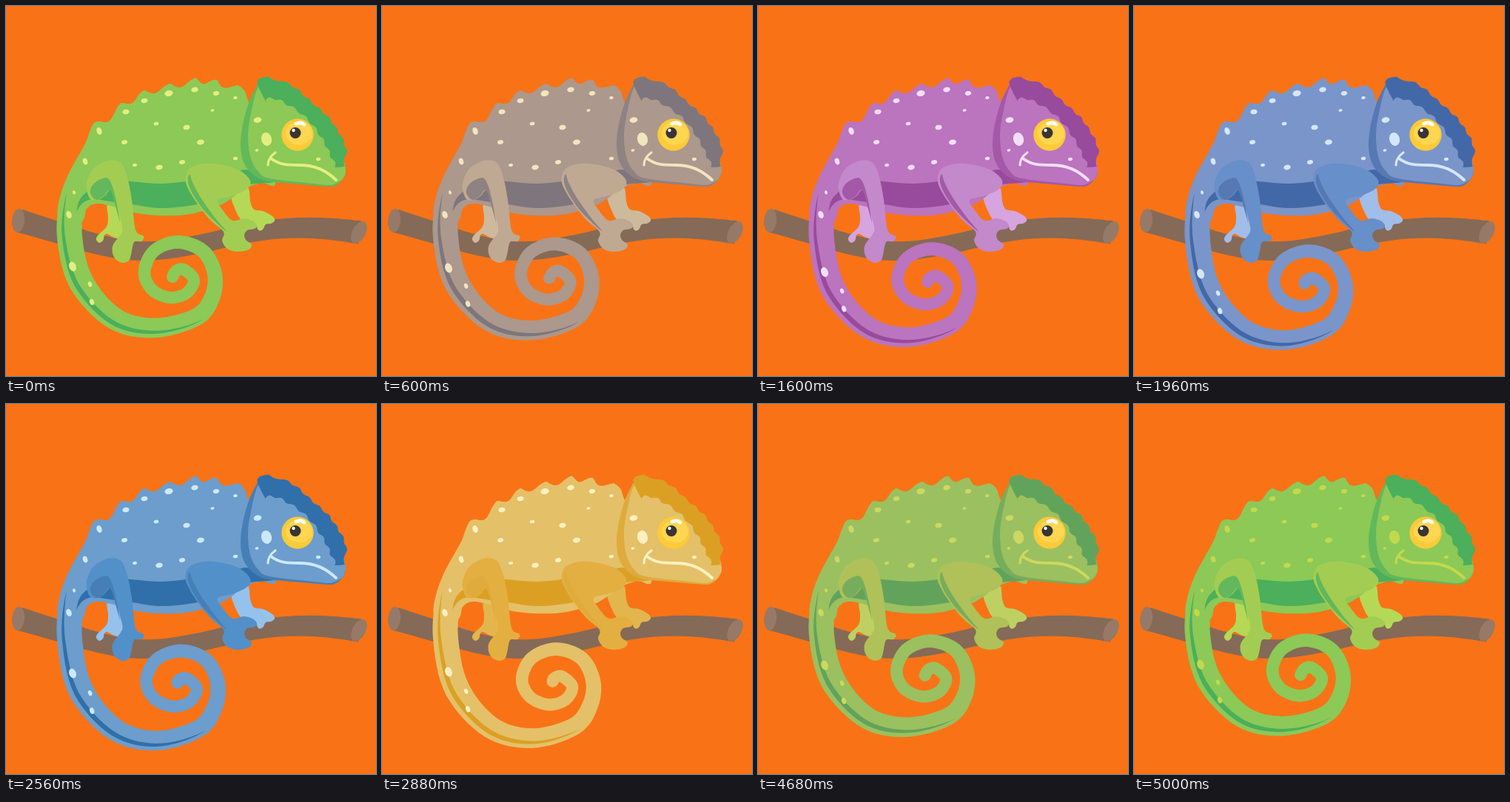
Write an HTML page that moves like this. It is 500 px wide and 500 px high and loops after 5080 ms.

```html
<!DOCTYPE html>
<html lang="en">
<head>
<meta charset="utf-8">
<title>Chameleon</title>
<style>
html, body { margin: 0; width: 100%; height: 100%; overflow: hidden; background: #f97316; }
svg { display: block; width: 100vw; height: 100vh; }
</style>
</head>
<body>
<svg id="stage" viewBox="0 0 500 500" xmlns="http://www.w3.org/2000/svg"></svg>
<script>
const NS = 'http://www.w3.org/2000/svg';
const stage = document.getElementById('stage');
const LOOP = 5080, STEP = 40, LAST = 5000, PEAK = 2400;
const clamp = v => Math.max(0, Math.min(1, v));
const mix = (a, b, u) => a + (b - a) * u;
const mixAll = (a, b, u) => a.map((v, i) => mix(v, b[i], u));
const parse = text => text.trim().split(/\s+/).map(p => p.split(',').map(Number));
const role = name => `var(--${name})`;

function add(tag, attrs) {
  const el = document.createElementNS(NS, tag);
  for (const key in attrs) el.setAttribute(key, attrs[key]);
  return stage.appendChild(el);
}

// Catmull-Rom between b and c at u
function spline(a, b, c, d, u) {
  return [0, 1].map(k => b[k] + u / 2 * (c[k] - a[k]
    + u * (2 * a[k] - 5 * b[k] + 4 * c[k] - d[k] + u * (3 * (b[k] - c[k]) + d[k] - a[k]))));
}

// Samples of an open curve; u counts the key points passed.
function curve(keys, n = 8) {
  const last = keys.length - 1, at = i => keys[Math.max(0, Math.min(last, i))];
  const place = u => {
    const i = Math.min(last - 1, Math.floor(u));
    return spline(at(i - 1), at(i), at(i + 1), at(i + 2), u - i);
  };
  return Array.from({ length: last * n + 1 }, (_, j) => {
    const u = j / n, p = place(u);
    const [x0, y0] = place(Math.max(0, u - .05)), [x1, y1] = place(Math.min(last, u + .05));
    const len = Math.hypot(x1 - x0, y1 - y0) || 1;
    return { u, p, normal: [(y1 - y0) / len, (x0 - x1) / len] };
  });
}
const offset = (samples, by) =>
  samples.map(({ u, p, normal }) => p.map((v, k) => v + normal[k] * by(u)));
const ribbon = (samples, a, b) => [...offset(samples, a), ...offset(samples, b).reverse()];

// Rounded crests at the key points with dips between them
const scallop = (keys, depth, lean = 1) =>
  offset(curve(keys), u => -depth * Math.sin(Math.PI * (u % 1) ** lean) ** 2);

// Closed smooth outline; a repeated point makes a corner.
function outline(pts) {
  const n = pts.length, at = i => pts[(i + n) % n];
  return 'M' + pts.flatMap((_, i) => [0, .25, .5, .75].map(u =>
    spline(at(i - 1), at(i), at(i + 1), at(i + 2), u).map(v => v.toFixed(1)))).join('L') + 'Z';
}

const shape = (fill, pts) => add('path', { fill, d: outline(pts) });
const blob = (fill, text) => shape(fill, parse(text));
const poly = pts => 'M' + pts.map(p => p.map(v => v.toFixed(1))).join('L') + 'Z';
const line = (stroke, width, d) => add('path', {
  d, stroke, 'stroke-width': width, fill: 'none', 'stroke-linecap': 'round', 'stroke-linejoin': 'round'
});
const oval = (fill, x, y, rx, ry = rx, turn = 0) => add('ellipse', {
  fill, rx, ry, transform: `translate(${x} ${y}) rotate(${turn})`
});
// Spots on the left flank stand upright, the others lie flat.
const spot = ([x, y, r]) => oval(role('spot'), x, y, r * 1.2, r * .84, x < 135 ? -110 : -10);

// Branch
const branch = curve(parse('17,290 70,306 120,321 165,330 210,330 260,322 300,313 345,304 390,300 435,301 478,306'));
const thick = u => 12.5 + 3.3 * (u / 5 - 1) ** 2;
add('path', { fill: '#856a57', d: poly(ribbon(branch, thick, u => -thick(u))) });
oval('#967a67', 16.5, 290, 8.5, 16, 6);
oval('#967a67', 477, 306, 9, 16, 28);

// Far legs
blob(role('far'), '137,268 152,270 158,312 147,313 137,308 133,310 131,317 126,320 122,316 124,310 136,298 138,285');
blob(role('far'), '304,252 326,244 330,264 335,275 347,277 360,284 363,290 358,294 351,295 347,302 341,303 336,294 322,292 312,280');

// Body
const back = scallop(parse('127,156 156,131 187,114 222,105 257,97.5 285,100 314,107.5'), 8, .66);
shape(role('main'), [
  ...parse('70,285 73,258 83,230 97,204 108,184 113,170 119,158'), ...back,
  ...parse(`322,114 326,125 329,131 345,150 365,237 345,239 322,247 302,262 280,273 243,282 205,283
    172,279 145,271 122,267 109,274 104,290 85,300`)
]);

// Tail: center line from the tip to the hip
const tailKeys = parse(`225,366 230,358 240,356 254,370 244,388 221,394 197,383 187,359 200,331 232,319
  266,331 282,362 278,395 256,421 200,435 146,422 101.5,373 86,312 90,262 102,235`);
const half = u => 8 + 9 * Math.min(1, u / 16) ** 4;
const STRIPE = [12.8, 18.2];
const stripeOut = u => .6 * half(u);
const stripeIn = u =>
  stripeOut(u) - 6.5 * Math.sin(Math.PI * clamp((u - STRIPE[0]) / (STRIPE[1] - STRIPE[0])));
const tail = add('path', { fill: role('main') });
const tip = add('circle', { fill: role('main'), r: half(0) });
const stripe = add('path', { fill: role('dark') });

// Dark belly
blob(role('dark'), `95,278 95,278 100,261 115,247 140,235 168,237 210,240 250,236 300,228 325,221 345,232 362,238
  330,241 305,249 275,264 240,271 205,273 170,268 140,264 118,261 104,266`);

// Near hind leg
blob(role('leg'), `109,248 110,235 119,219 137,209 154,211 163,228 170,262 175,303 186,311 183,318 173,319
  169,336 166,344 158,347 149,343 144,334 145,322 157,305 155,290 145,254 140,249 133,257 124,262 114,261`);
blob(role('shade'), '114,253 117,242 128,234 139,234 147,255 154,292 150,278 141,249 132,257 122,262');

// Near front leg
blob(role('leg'), `243,230 249,219 268,213 294,215 317,223 330,236 326,247 308,256 286,262 293,276 306,290 321,287
  333,290 339,296 336,301 326,303 322,310 325,317 332,322 328,329 313,332 299,328 292,317 294,305 275,288
  255,262 244,242`);
blob(role('shade'), '248,227 246,238 254,257 272,281 298,305 280,283 262,257 252,238');

// Head
blob(role('shade'), `341,104 341,104 329,128 320,160 317,188 321,211 333,227 350,236 375,239 410,242 436,244 446,242
  456,232 457,215 430,150 380,108`);
blob(role('main'), '343,106 330,150 327,180 331,207 341,224 356,233 415,240 437,242 447,239 456,232 458,215 440,165 400,125 370,105');
shape(role('dark'), [
  ...parse('340,106 343,98'),
  ...scallop(parse('354,95.5 380,103 396,113 410,126 424,138 437,150 447,164 456,179 461,196 457,217'), 2.5),
  ...scallop(parse('445,218 438,204 431,189 422,174 410,158 396,145 379,134 364,127 350,127'), 3)
]);

// Eye
oval('#fdca38', 394, 174, 21.7);
oval('#ffd650', 396, 172, 18, 15.5);
oval('#393533', 391, 171.5, 7.5);
oval('#fff', 388.5, 168, 2.2);
line('#fff', 5, 'M392 159Q399 156 403 160');

// Mouth
line(role('spot'), 4, 'M358 206C370 215 381 215 396 215C418 215 432 222 446 235');
line(role('spot'), 3.2, 'M364 198C357 203 354 208 354 215');

// Spots: x, y, radius
parse(`340,154,4.5 339,195,2 422,207,2.6 310,206,2.7 126,169,4.2 162,143,3.8 187,128,3.7 220,118,4.7
  255,113,4 284,118,3.5 310,124,2.3 279,141,2.1 203,159,2.8 244,164,3.8 263,184,4.2 160,184,3.4
  107,210,3.7 174,215,2.5 207,218,4 238,211,3.4 92,252,2.3 85,282,4.3`).forEach(spot);
oval(role('spot'), 352, 180, 7, 9, -15);
const tailSpots = parse('90,352,5.6 113.5,376,3.1 116,400,3.6').map(s => ({ at: s, el: spot(s) }));

// Skins
const roles = ['main', 'dark', 'leg', 'far', 'spot', 'shade'];
function skin(text) {
  const list = text.split(' ').map(h => [0, 2, 4].map(i => parseInt(h.slice(i, i + 2), 16)));
  return [...list, mixAll(list[0], list[1], .65)];
}
const green = skin('8cc957 4baf5b a3cd52 b5d957 e4ee80');
const fades = [
  [400, 780, skin('c96cbb ab439a d888cb e29fdb fcdcfa')],
  [1520, 2040, skin('6c9dcc 306fa9 5290c9 95c2ec cbe8fc')],
  [2560, 2880, skin('e4c069 dba023 e4af41 e2b64d fff0c0')],
  [2960, 3360, skin('ec8e86 dd6258 ec8277 f5a39b ffd3cc')],
  [4260, 4760, skin('8cc957 4baf5b a3cd52 b5d957 c3d94b')]
];
const skinAt = t => fades.reduce((now, [start, end, next]) => {
  const u = clamp((t - start) / (end - start));
  return now.map((c, i) => mixAll(c, next[i], u));
}, green);

// The lower tail stretches down and the coil drifts right.
const sag = t => 1.06 * Math.min(t / PEAK, (LOOP - t) / (LOOP - PEAK)) ** 1.35;
function warp([x, y], k) {
  const free = Math.min(1, clamp((x - 130) / 40) + clamp((y - 270) / 100));
  return [x + 4 * k * clamp((x - 110) / 120), y + k * (15 * free + 7 * clamp((y - 400) / 45))];
}

function draw(ms) {
  const t = Math.min(LAST, Math.floor((ms % LOOP) / STEP) * STEP);
  skinAt(t).forEach((c, i) => stage.style.setProperty('--' + roles[i], `rgb(${c.map(Math.round)})`));

  const k = sag(t);
  const keys = tailKeys.map(p => warp(p, k));
  keys[0] = [keys[0][0] + 3 * k, keys[0][1] - 4 * k];
  const center = curve(keys);
  tail.setAttribute('d', poly(ribbon(center, half, u => -half(u))));
  tip.setAttribute('cx', keys[0][0]);
  tip.setAttribute('cy', keys[0][1]);
  const part = center.filter(s => s.u >= STRIPE[0] && s.u <= STRIPE[1]);
  stripe.setAttribute('d', poly(ribbon(part, stripeOut, stripeIn)));
  for (const { at, el } of tailSpots) {
    const [x, y] = warp(at, k);
    el.setAttribute('transform', `translate(${x} ${y}) rotate(-110)`);
  }
}

const begin = performance.now();
function tick() {
  draw(performance.now() - begin);
  requestAnimationFrame(tick);
}
tick();
</script>
</body>
</html>
```
